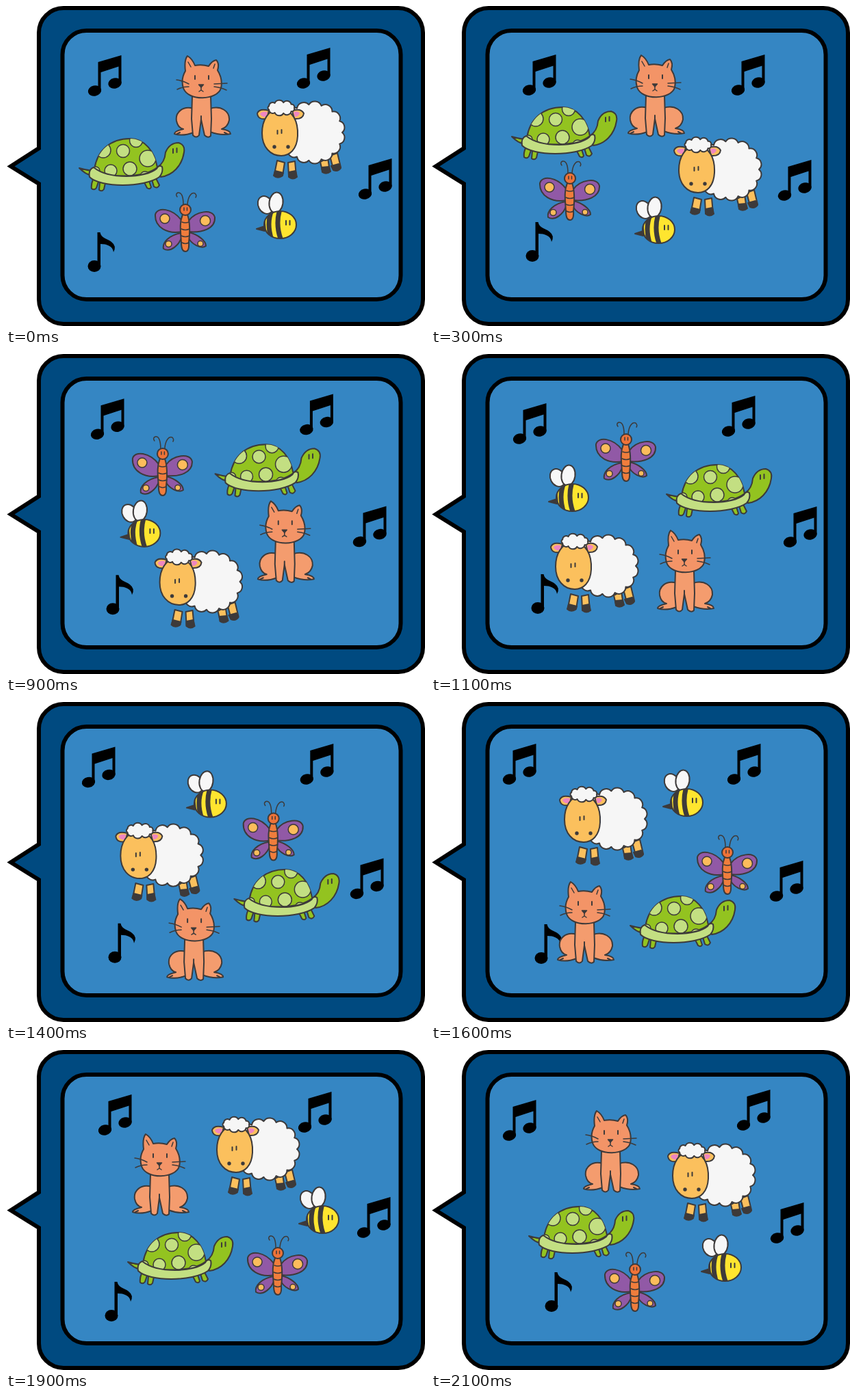
Recreate the animation shown at these times as an HTML page. Size 612x468 px, loop 2200 ms.

```html
<!DOCTYPE html>
<html lang="en">
<head>
<meta charset="utf-8">
<title>Animals and music</title>
<style>
html, body { margin: 0; width: 100%; height: 100%; overflow: hidden; background: #fff; }
svg { display: block; width: 612px; height: 468px; }
.ink { stroke: #3d3a3a; stroke-width: 2; stroke-linejoin: round; stroke-linecap: round; }
.line { fill: none; }
.thin { stroke-width: 1.5; }
.dark { fill: #3d3a3a; }
</style>
</head>
<body>
<svg viewBox="0 0 612 468">
  <defs>
    <g id="duo">
      <ellipse cx="9.5" cy="52" rx="9.8" ry="7.6" transform="rotate(-12 9.5 52)"/>
      <ellipse cx="39" cy="41" rx="9.8" ry="7.6" transform="rotate(-12 39 41)"/>
      <path d="M14.5 10 48.5 0V41H44.5V16.500L18.500 25V52H14.500Z"/>
    </g>
    <clipPath id="dome"><path id="domeShape" d="M129 239C133 211 153 194 181 194C203 194 217 213 221 236C202 251 150 253 129 239Z"/></clipPath>
    <clipPath id="beeClip"><ellipse cx="400.500" cy="320" rx="23.500" ry="20"/></clipPath>
  </defs>

  <g stroke="#000" stroke-width="6">
    <path fill="#004a80" d="M48 208V39A36 36 0 0 1 84 3H573A36 36 0 0 1 609 39V429A36 36 0 0 1 573 465H84A36 36 0 0 1 48 429V260L7 234.500Z"/>
    <rect x="82.500" y="36" width="494" height="393" rx="35" fill="#3586c3"/>
  </g>

  <g id="noteA"><use href="#duo" x="120" y="72"/></g>
  <g id="noteB"><use href="#duo" x="425" y="61"/></g>
  <g id="noteC"><use href="#duo" x="515" y="223"/></g>
  <g id="noteD">
    <ellipse cx="129" cy="380.500" rx="9.500" ry="8.500"/>
    <path d="M133.500 331H137.500C139 340 148 340 154 345Q162 351 157 360C156 351 147 348 138 348V380H133.500Z"/>
  </g>

  <g id="turtle" class="ink" fill="#93c320">
    <path d="M124 247Q117 247 107 237Q117 240 126 241Z"/>
    <path d="M127 254Q124 261 125 267Q129 270 132 266L135 257M137 258L136 269Q140 272 143 268L145 259M202 258L206 266Q210 269 212 265L209 256M213 254L216 264Q221 268 224 262L219 252"/>
    <path d="M221 236Q232 229 233 214Q239 200 252 200Q262 203 260 214C257 234 243 248 226 250Z"/>
    <use href="#domeShape"/>
    <g class="thin" fill="#c3df82" clip-path="url(#dome)">
      <circle cx="142" cy="211" r="11"/><circle cx="171" cy="212" r="9.500"/>
      <circle cx="190" cy="197" r="9.500"/><circle cx="207" cy="223" r="12"/>
      <circle cx="181" cy="238" r="10"/><circle cx="153" cy="241" r="9"/>
      <circle cx="131" cy="241" r="6"/><circle cx="203" cy="249" r="7"/>
    </g>
    <path fill="#c3df82" d="M128 236Q120 239 122 250C138 266 201 266 224 250Q230 243 228 235Q223 232 220 238C204 252 150 254 128 236Z"/>
    <path class="line" d="M244 209V215M249.500 208V214"/>
  </g>

  <g id="butterfly" class="ink">
    <g fill="#9159a6">
      <path d="M256 313C243 296 221 293 218 305C217 324 236 334 257 330Z"/>
      <path d="M267 314C277 300 302 296 305 309C306 326 286 332 266 330Z"/>
      <path d="M256 332C238 335 228 346 230 355C240 361 253 350 257 337Z"/>
      <path d="M267 331C280 334 292 343 292 351C285 356 270 348 266 338Z"/>
    </g>
    <g class="thin" fill="#fcbc5b">
      <circle cx="232" cy="311" r="7"/><circle cx="291" cy="314" r="7.500"/>
      <circle cx="237.500" cy="348" r="4.500"/><circle cx="284" cy="347.500" r="4"/>
    </g>
    <path class="line thin" d="M259 290C259 278 256 272 251 273Q247 275 250 279M265 290C266 278 271 272 276 274Q279 277 277 280"/>
    <path fill="#f07d3c" d="M258 305C253 317 255 329 256 346Q256 359 262 359Q268 359 267 346C269 329 269 316 265 305Z"/>
    <path class="line thin" d="M257 316Q262 318 267 316M256 326Q262 329 268 326M256 336Q262 339 268 336M257 346Q262 349 267 346"/>
    <circle cx="262" cy="298" r="8" fill="#ef7338"/>
    <path class="line thin" d="M260 295V299M264.500 295V299"/>
  </g>

  <g id="bee" class="ink">
    <g fill="#f7f7f7">
      <ellipse cx="379" cy="291" rx="10.500" ry="13.500" transform="rotate(-28 379 291)"/>
      <ellipse cx="394.500" cy="287.500" rx="10" ry="15" transform="rotate(8 394.500 287.500)"/>
    </g>
    <path class="dark" d="M378 322L366 326L378 329Z"/>
    <ellipse cx="400.500" cy="320" rx="23.500" ry="20" fill="#ffe52f"/>
    <g class="line" clip-path="url(#beeClip)" stroke-width="7">
      <path d="M388 299Q380 318 388 342M400 297Q393 320 402 343"/>
      <path d="M378 306Q374 320 380 335" stroke-width="5"/>
    </g>
    <path class="line" d="M409 314V320M414.500 314V320"/>
  </g>

  <g id="sheep" class="ink">
    <g fill="#fbc05d">
      <path d="M396 226L392 246Q398 252 404 248L407 229ZM412 229L413 249Q419 254 424 249L422 227ZM459 228L462 241Q468 246 473 242L470 222ZM473 219L478 238Q485 241 489 236L484 215Z"/>
    </g>
    <path class="dark" d="M393 241L391 248Q396 253 403 249L405 244ZM413 243V250Q419 255 425 250L423 241ZM461 236L462 243Q468 247 474 242L472 235ZM475 234L478 240Q485 243 489 237L486 231Z"/>
    <path id="wool" fill="#f6f6f6"/>
    <g fill="#fbc05d">
      <path d="M384 153Q370 149 367 157Q368 167 381 165ZM418 153Q431 149 435 157Q434 166 421 165Z"/>
      <path class="thin" stroke="none" fill="#ef86c0" d="M382 155Q373 153 371 158Q374 163 380 162ZM420 155Q427 153 429 157Q427 162 422 162Z"/>
      <path d="M400 151C419 151 427 169 426 190C425 210 414 219 402 219C386 219 374 206 374 186C374 167 383 151 400 151Z"/>
    </g>
    <path id="tuft" fill="#f6f6f6"/>
    <path class="line" d="M396.500 182V187M402.500 181V186"/>
    <g class="dark" stroke="none"><circle cx="392" cy="206" r="2.700"/><circle cx="412" cy="206" r="2.700"/></g>
  </g>

  <g id="cat" class="ink" fill="#f49c6e">
    <path d="M274 150C258 145 247 156 249 168Q251 178 259 180Q246 183 246 187Q258 191 274 185ZM298 150C314 145 327 154 326 167Q324 177 315 180Q328 182 328 187Q314 190 298 184Z"/>
    <path d="M272 132L271 165L273 189Q278 194 282 189L285 166L290 189Q295 194 299 190L300 165L299 132Z"/>
    <path class="line" d="M285 161V166M250 187L254 185M323 187L319 185"/>
    <path fill="#f39467" d="M262 95Q260 79 265 73Q272 77 276 87Q286 85 296 88Q301 80 307 79Q312 84 309 94Q317 107 314 120C309 138 266 140 259 120Q255 107 262 95Z"/>
    <path class="line thin" d="M266 82L270 89M305 85L303 91"/>
    <path class="line" d="M276 102V107M296 102V107"/>
    <path class="line thin" d="M267 114Q258 109 249 108M267 118Q258 118 250 122M304 114L323 113M304 118Q314 119 322 123"/>
    <path class="dark thin" d="M281.500 115H288.500L285 119Z"/>
    <path class="line thin" d="M285 119V123L282 125M285 123L288 125"/>
  </g>
</svg>

<script>
const STEP = 100, COUNT = 22;
const times = [0, 3, 6, 11, 16, 19, 21];

// x, y pairs at the key times
const animals = {
  cat: [287, 132, 329, 131, 417, 192, 372, 317, 226, 322, 226, 182, 264, 148],
  sheep: [431, 194, 419, 248, 365, 331, 239, 319, 252, 180, 365, 154, 410, 192],
  turtle: [184, 232, 195, 186, 288, 154, 421, 200, 368, 322, 255, 305, 220, 267],
  butterfly: [261, 316, 202, 270, 174, 226, 284, 143, 432, 238, 396, 315, 297, 339],
  bee: [395, 306, 327, 313, 242, 317, 201, 196, 368, 133, 457, 234, 424, 304]
};
const notes = {
  noteA: [120, 72, 134, 71, 130, 55, 120, 72, 105, 61, 135, 65, 105, 73],
  noteB: [425, 61, 439, 71, 436, 55, 425, 61, 433, 61, 427, 61, 447, 58],
  noteC: [515, 223, 507, 225, 495, 222, 515, 223, 495, 232, 513, 215, 496, 223],
  noteD: [120, 331, 139, 316, 147, 325, 147, 322, 152, 325, 145, 339, 167, 325]
};

const byId = id => document.getElementById(id);
const wrap = i => (i + times.length) % times.length;
const span = i => (times[wrap(i + 1)] - times[wrap(i)] + COUNT) % COUNT;

// Closed curve through the keys; smooth Hermite or straight segments
function sample(keys, axis, time, smooth) {
  const at = i => keys[2 * wrap(i) + axis];
  const slope = i => (at(i + 1) - at(i)) / span(i);
  const tangent = i =>
    (slope(i - 1) * span(i) + slope(i) * span(i - 1)) / (span(i - 1) + span(i));
  const i = times.findLastIndex(t => t <= time);
  const h = span(i), u = (time - times[i]) / h, v = 1 - u;
  if (!smooth) return at(i) * v + at(i + 1) * u;
  return at(i) * (1 + 2 * u) * v * v + at(i + 1) * (1 + 2 * v) * u * u +
    h * u * v * (tangent(i) * v - tangent(i + 1) * u);
}

function place(tracks, time, smooth) {
  for (const [id, keys] of Object.entries(tracks)) {
    const [dx, dy] = [0, 1].map(a => sample(keys, a, time, smooth) - keys[a]);
    byId(id).setAttribute("transform", `translate(${dx} ${dy})`);
  }
}

// Fluffy outline: arcs between points on an ellipse
function scallop(id, cx, cy, rx, ry, n) {
  const point = i => {
    const a = i / n * 2 * Math.PI;
    return [cx + rx * Math.cos(a), cy + ry * Math.sin(a)];
  };
  let last = point(0), d = "M" + last;
  for (let i = 1; i <= n; i++) {
    const p = point(i), r = Math.hypot(p[0] - last[0], p[1] - last[1]) * 0.56;
    d += `A${r} ${r} 0 0 1 ${p}`;
    last = p;
  }
  byId(id).setAttribute("d", d + "Z");
}
scallop("wool", 447, 185, 44, 41, 15);
scallop("tuft", 402, 149, 19, 8, 9);

function draw() {
  const time = Math.floor(performance.now() / STEP) % COUNT;
  place(animals, time, true);
  place(notes, time, false);
  requestAnimationFrame(draw);
}
draw();
</script>
</body>
</html>
```
